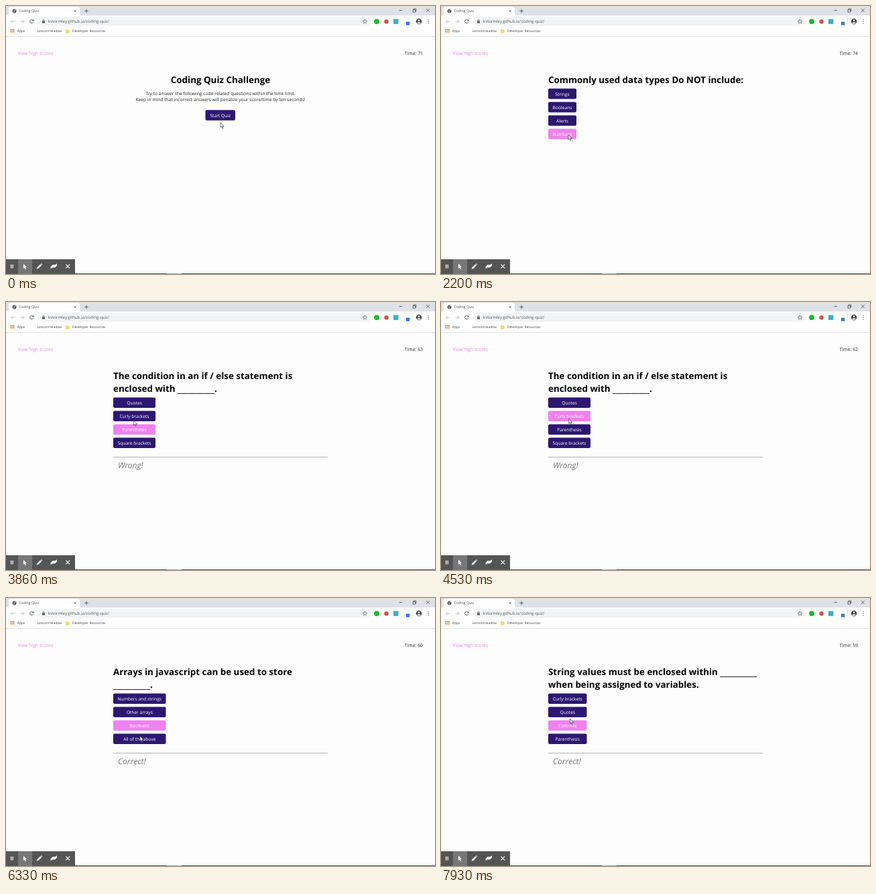
Write an HTML page that moves like this. It is 640 px wide and 400 px high and loops after 8 s.

```html
<!DOCTYPE html>
<html lang="en">
<head>
<meta charset="utf-8">
<title>Coding Quiz</title>
<style>
html, body { margin: 0; width: 100%; height: 100%; overflow: hidden; background: #fdfdfd; }
svg { display: block; width: 640px; height: 400px; }
text { font: 6.7px "Open Sans", "Noto Sans", sans-serif; text-rendering: geometricPrecision; fill: #222; white-space: pre; }
.head { font-size: 13.38px; font-weight: 700; fill: #000; }
.mid { text-anchor: middle; }
.end { text-anchor: end; }
.bar { font-size: 6.85px; }
.btn { fill: #2c1870; }
.btn.hover { fill: #ee82ee; }
.btn + text { fill: #fff; }
.result { font-size: 12.1px; font-style: italic; fill: #777; }
.link { fill: #e883e8; }
.tab { font-size: 5.25px; fill: #444; }
.url { font-size: 6.05px; fill: #555; }
.mark { font-size: 5.05px; fill: #444; }
.line { fill: none; stroke: #555; stroke-width: .9; }
.thin { stroke-width: .65; }
.pale { stroke: #bbb; }
.white { fill: none; stroke: #fff; stroke-width: 1.2; }
</style>
</head>
<body>
<svg viewBox="0 0 640 400">
  <rect width="640" height="400" fill="#fdfdfd"/>

  <!-- Browser window -->
  <rect width="640" height="14.5" fill="#dee1e6"/>
  <path d="M1 14.5Q4 14.5 4 11V4Q4 1 7 1H107Q110 1 110 4V11Q110 14.5 113 14.5Z" fill="#fff"/>
  <rect y="14.5" width="640" height="30.5" fill="#fff"/>
  <rect y="45" width="640" height=".7" fill="#dcdcdc"/>
  <circle cx="12.5" cy="7.5" r="3" fill="#555"/>
  <path d="M10.5 6.5L12.5 7.5 12 9.5M13 5L14.5 7" fill="none" stroke="#fff" stroke-width=".7"/>
  <text class="tab" x="19.5" y="9.4">Coding Quiz</text>
  <path class="line" d="M101.3 5.8l3.4 3.4m0-3.4l-3.4 3.4M117.2 7.5h5.6M120 4.7v5.6"/>
  <path class="line" d="M586.7 6.5h4.6M607 5.5h3.6v3.6h-3.6zM608.2 5.3v-1.1h3.6v3.6h-1.1M627 4.2l4.6 4.6m0-4.6l-4.6 4.6"/>
  <path class="line pale" d="M13 23H7.2m2.7-2.7L7.2 23l2.7 2.7M21.2 23H27m-2.7-2.7L27 23l-2.7 2.7"/>
  <path class="line" d="M40.5 21.2A2.8 2.8 0 1 0 41 24"/>
  <path d="M41.3 19.7v2.8h-2.8z" fill="#555"/>
  <rect x="48" y="16.5" width="497" height="13" rx="6.5" fill="#f1f3f4"/>
  <rect x="54.1" y="22.2" width="3.8" height="3.4" fill="#555"/>
  <path class="line thin" d="M54.9 22.2v-.8a1.1 1.1 0 0 1 2.2 0v.8"/>
  <text class="url" x="63" y="25.2">kvtormley.github.io/coding-quiz/</text>
  <path class="line thin" d="M535.5 20l.9 2.1 2.2.2-1.7 1.5.5 2.2-1.9-1.2-1.9 1.2.5-2.2-1.7-1.5 2.2-.2z"/>
  <circle cx="553" cy="23.2" r="3.9" fill="#1fba34"/>
  <circle cx="567.5" cy="23.2" r="3.2" fill="#dc4a44"/>
  <rect x="578" y="19.5" width="7.4" height="7.4" fill="#38b3bd"/>
  <rect x="597" y="23.5" width="5.2" height="5.2" fill="#2f78e0"/>
  <rect x="606" y="18" width=".6" height="10" fill="#ddd"/>
  <circle cx="616" cy="23" r="4.2" fill="#444"/>
  <circle cx="616" cy="21.6" r="1.4" fill="#fff"/>
  <path d="M613.3 25.4Q616 22.8 618.7 25.4 616 27.7 613.3 25.4" fill="#fff"/>
  <path d="M630 20.1h.1M630 23h.1M630 25.9h.1" stroke="#555" stroke-width="1.4" stroke-linecap="round"/>
  <path d="M6.5 35.2h6" stroke="#db4b3c" stroke-width="1.5" stroke-dasharray="1.5 .75"/>
  <path d="M6.5 37.5h6" stroke="#3f8f55" stroke-width="1.5" stroke-dasharray="1.5 .75"/>
  <path d="M6.5 39.8h6" stroke="#dfa82b" stroke-width="1.5" stroke-dasharray="1.5 .75"/>
  <text class="mark" x="16.7" y="39.2">Apps</text>
  <text class="mark" x="46.5" y="39.2">Lessonmeadow</text>
  <path d="M89 34.8h2.4l.8.8h2.5v5H89z" fill="#f7d56d"/>
  <text class="mark" x="99" y="39.2">Developer Resources</text>

  <!-- Page -->
  <text class="bar link" x="17.5" y="73.4">View high scores</text>
  <text id="time" class="bar end" x="622" y="73.4"></text>
  <g id="screens"></g>
  <g id="feedback">
    <rect x="160" y="231" width="320" height="1" fill="#b4b4b4"/>
    <text id="result" class="result" x="167" y="248"></text>
  </g>

  <!-- Recorder bar -->
  <rect x="103" y="399.2" width="537" height=".8" fill="#333"/>
  <rect x="240" y="399" width="22" height="1" fill="#aaa"/>
  <rect y="378" width="103" height="22" fill="#555"/>
  <rect x="18" y="378" width="21" height="22" fill="#777"/>
  <path class="white" d="M7.6 385.8v5.6M10.2 385.8v5.6M89.4 385.6l5.8 5.8m0-5.8l-5.8 5.8"/>
  <path d="M26 384.6v7.3l1.7-1.5 1.1 2.5 1.2-.5-1.1-2.5h2.2zM45.8 392.6l.6-2.3 5-5 1.8 1.8-5 5zM51.9 384.8l.7-.7 1.8 1.8-.7.7zM66.5 392.3v-3l3.2-3 2.6.2 3.6-2v3.2l-3.3 2.8-2.6-.2z" fill="#fff"/>

  <circle id="ring" fill="#d878b8" fill-opacity=".3" stroke="#d62856" stroke-width="1.1"/>
  <path id="cursor" d="M0 0V7.4L1.7 5.9 2.9 8.7 4.1 8.2 2.9 5.5H5.1Z" fill="#fff" stroke="#333" stroke-width=".7"/>
</svg>
<script>
const LOOP = 8000, HOVER_LAG = 100, RING_MS = 300;
const $ = id => document.getElementById(id);

const questions = [
  { lines: ["Commonly used data types Do NOT include:"], width: 42,
    answers: ["Strings", "Booleans", "Alerts", "Numbers"] },
  { lines: ["The condition in an if / else statement is", "enclosed with __________."], width: 63,
    answers: ["Quotes", "Curly brackets", "Parenthesis", "Square brackets"] },
  { lines: ["Arrays in javascript can be used to store", "__________."], width: 78.5,
    answers: ["Numbers and strings", "Other arrays", "Booleans", "All of the above"] },
  { lines: ["String values must be enclosed within __________", "when being assigned to variables."], width: 57.5,
    answers: ["Curly brackets", "Quotes", "Commas", "Parenthesis"] }
];
const clicks = [960, 2480, 5060, 6930];
const results = ["", "", "Wrong!", "Correct!", "Correct!"];

// Cursor path: time, x, y
const path = [
  [0, 320, 174], [60, 320, 174], [400, 318.8, 166.8], [1330, 318.8, 166.8],
  [2130, 190, 192], [2860, 189.3, 192.7], [3600, 189.3, 192.7], [4060, 191, 166],
  [4530, 190.7, 174], [5000, 193.7, 193.5], [5260, 193.7, 193.5], [6240, 194, 195],
  [6330, 200, 206], [6600, 202, 211], [7480, 202, 211], [7780, 195, 192],
  [7930, 192.5, 180], [8000, 191.5, 176]
];

const text = (str, x, y, cls = "") => `<text class="${cls}" x="${x}" y="${y}">${str}</text>`;
const button = (str, x, y, w) =>
  `<rect class="btn" x="${x}" y="${y}" width="${w}" height="15.6" rx="2"/>` +
  text(str, x + w / 2, y + 10.3, "mid");
// Blanks sit a little below the baseline
const lowerBlank = str => str.replace(/(_+)(.?)/, '<tspan dy=".9">$1</tspan><tspan dy="-.9">$2</tspan>');

const intro = text("Coding Quiz Challenge", 320, 115, "head mid") +
  text("Try to answer the following code-related questions within the time limit.", 320, 132.8, "mid") +
  text("Keep in mind that incorrect answers will penalize your score/time by ten seconds!", 320, 142.3, "mid") +
  button("Start Quiz", 297.5, 155.2, 44.5);

const quiz = ({ lines, width, answers }) =>
  lines.map((s, i) => text(lowerBlank(s), 160, 115 + 19 * i, "head")).join("") +
  answers.map((s, i) => button(s, 160, 104 + 19.2 * lines.length + 20 * i, width)).join("");

$("screens").innerHTML = [intro, ...questions.map(quiz)].map(s => `<g>${s}</g>`).join("");
const screens = [...$("screens").children].map(el => ({
  el,
  buttons: [...el.querySelectorAll("rect")].map(rect => ({ rect, box: rect.getBBox() }))
}));

function cursorAt(t) {
  t = Math.max(t, 0);
  const i = path.findIndex(p => p[0] > t);
  const [t0, x0, y0] = path[i - 1], [t1, x1, y1] = path[i];
  const k = (t - t0) / (t1 - t0), e = k * k * (3 - 2 * k);
  return [x0 + (x1 - x0) * e, y0 + (y1 - y0) * e];
}

function timeLeft(t) {
  if (t < clicks[0]) return 71;
  const ticks = Math.max(0, Math.floor((t + 20) / 1000) - 1);
  return 75 - ticks - (t >= clicks[1] ? 10 : 0);
}

function draw(now) {
  const t = now % LOOP;
  const step = clicks.filter(c => t >= c).length;
  const [x, y] = cursorAt(t), [hx, hy] = cursorAt(t - HOVER_LAG);

  screens.forEach(({ el, buttons }, i) => {
    el.style.display = i === step ? "" : "none";
    for (const { rect, box } of buttons) {
      const over = hx >= box.x && hx <= box.x + box.width && hy >= box.y && hy <= box.y + box.height;
      rect.classList.toggle("hover", over);
    }
  });

  $("time").textContent = "Time: " + timeLeft(t);
  $("result").textContent = results[step];
  $("feedback").style.display = results[step] ? "" : "none";
  $("cursor").setAttribute("transform", `translate(${x} ${y})`);

  const age = step ? t - clicks[step - 1] : RING_MS;
  const ring = $("ring");
  ring.style.display = age < RING_MS ? "" : "none";
  ring.setAttribute("cx", x);
  ring.setAttribute("cy", y);
  ring.setAttribute("r", 6 + Math.min(age, RING_MS) * .0175);
  requestAnimationFrame(() => draw(performance.now() - start));
}

const start = performance.now();
draw(0);
</script>
</body>
</html>
```
